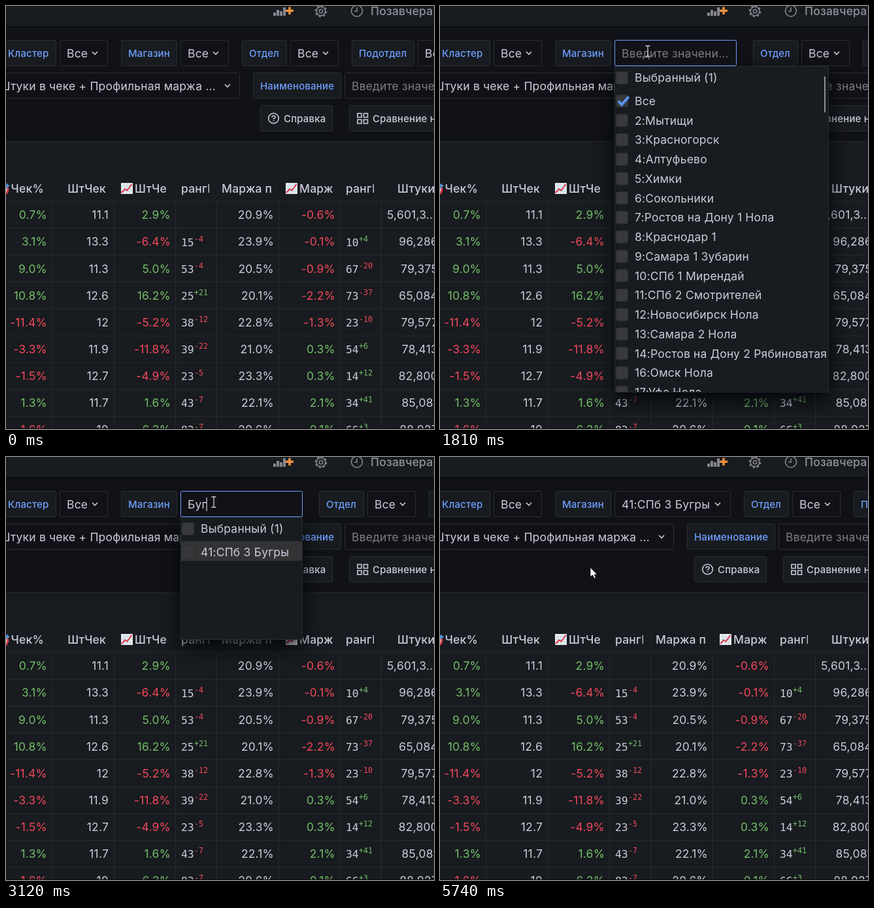
These frames come from a looping animation (655 by 648 pixels, 8 s). An HTML page:

```html
<!DOCTYPE html>
<html lang="ru">
<head>
<meta charset="utf-8">
<style>
html, body { margin: 0; width: 100%; height: 100%; overflow: hidden; background: #111217; }
svg { display: block; }
text { font: 17.5px Inter, sans-serif; letter-spacing: .0107em; fill: #ccccdc; white-space: pre; }
.label { font-size: 15px; font-weight: 500; fill: #6e9fff; }
.button { font-size: 15px; font-weight: 500; }
.head { font-weight: 500; }
.time { font-weight: 500; fill: #92929d; }
.hint { fill: #7b7c86; }
.up { fill: #73bf69; }
.down { fill: #f2495c; }
.rank, .sup { font: 16.4px "DejaVu Sans Mono", monospace; letter-spacing: 0; }
.sup { font-size: 11.7px; }
.icon { fill: none; stroke: #ccccdc; stroke-width: 1.6; }
</style>
</head>
<body>
<svg id="stage" width="655" height="648" viewBox="0 0 655 648">
  <defs>
    <filter id="shadow" filterUnits="userSpaceOnUse" x="200" y="30" width="460" height="640" color-interpolation-filters="sRGB">
      <feDropShadow dx="0" dy="10" stdDeviation="15" flood-color="rgb(1,4,9)"/>
    </filter>
    <g id="chart">
      <rect width="18" height="17" rx="1" fill="#e9edf0"/>
      <path d="M0 4.5H18M0 8.5H18M0 12.5H18M4.5 0V17M9 0V17M13.5 0V17" stroke="#b9d3df" stroke-width=".8"/>
      <path d="M1 15L6 9.500L9.500 11.500L16.500 2" fill="none" stroke="#dc3548" stroke-width="2"/>
    </g>
  </defs>
  <g id="base"></g>
  <g id="live"></g>
  <g id="pointer"></g>
</svg>
<script>
const LOOP = 8000;
const $ = id => document.getElementById(id);

// Text is placed by the vertical centre of its capitals, on a whole-pixel baseline.
const text = (x, y, s, cls = '', anchor = 'start') => {
  const size = /label|button/.test(cls) ? 15 : cls.includes('sup') ? 11.7 : cls.includes('rank') ? 16.4 : 17.5;
  return `<text x="${x}" y="${Math.round(y + size * .364)}" class="${cls}" text-anchor="${anchor}">${s}</text>`;
};
const rect = (x, y, w, h, fill, extra = '') =>
  `<rect x="${x}" y="${y}" width="${w}" height="${h}" fill="${fill}" ${extra}/>`;
const box = (x1, y1, x2, fill, stroke = '#2b2e34') =>
  rect(x1 + .5, y1 + .5, x2 - x1 - 1, 39, fill, `rx="2" stroke="${stroke}"`);
const chevron = (x, y) => `<path class="icon" d="M${x - 4} ${y - 2}l4 4l4-4"/>`;
const label = (x1, x2, y, s) => box(x1, y, x2, '#181b1f') + text(x1 + 11, y + 20.5, s, 'label');
const select = (x1, x2, s) => box(x1, 52, x2, '#111217') + text(x1 + 11, 72.5, s) + chevron(x2 - 20, 72);
const sign = s => s[0] === '-' ? 'down' : 'up';

const columns = [70, 165, 259, 322, 417, 511, 574];
const rows = [
  '0.7% 11.1 2.9% _ 20.9% -0.6% _ 5,601,3...',
  '3.1% 13.3 -6.4% 15-4 23.9% -0.1% 10+4 96,286',
  '9.0% 11.3 5.0% 53-4 20.5% -0.9% 67-20 79,375',
  '10.8% 12.6 16.2% 25+21 20.1% -2.2% 73-37 65,084',
  '-11.4% 12 -5.2% 38-12 22.8% -1.3% 23-10 79,577',
  '-3.3% 11.9 -11.8% 39-22 21.0% 0.3% 54+6 78,413',
  '-1.5% 12.7 -4.9% 23-5 23.3% 0.3% 14+12 82,800',
  '1.3% 11.7 1.6% 43-7 22.1% 2.1% 34+41 85,081',
  '-1.6% 10 6.3% 83-7 20.6% 0.1% 66+3 88,927'
];

function cell(value, col, y) {
  if (value === '_') return '';
  if (col === 3 || col === 6) {
    const x = columns[col - 1] + 9, delta = value.slice(2);
    return text(x, y + .5, value.slice(0, 2), 'rank') + text(x + 20, y - 4.5, delta, 'sup ' + sign(delta));
  }
  if (col === 7) return value.includes('...') ? text(583, y, value) : text(661, y, value, '', 'end');
  const colored = col === 0 || col === 2 || col === 5;
  const pad = value.endsWith('%') ? 7 : 8;
  return text(columns[col] - pad, y, value, colored ? sign(value) : '', 'end');
}

function table() {
  let out = rect(0, 207, 655, 441, '#181b1f') + rect(0, 207, 655, 1, '#25272d');
  const clipped = (x, w, s) => `<svg x="${x}" y="265" width="${w}" height="30">${text(0, 15, s, 'head')}</svg>`;
  out += '<circle cx="-5" cy="281" r="8" fill="#d8dce0" stroke="#d33a45" stroke-width="3"/>' +
    '<path d="M-3 281L3 275" stroke="#3f8fd0" stroke-width="2.500"/><path d="M0 275l2-4l1 3l3 1l-4 3z" fill="#4aa3e8"/>';
  out += text(58, 280, 'Чек%', 'head', 'end') + text(153, 280, 'ШтЧек', 'head', 'end') +
    text(197, 280, 'ШтЧе', 'head') + clipped(268, 43, 'рангШт') + clipped(330, 76, 'Маржа п') +
    text(449, 280, 'Марж', 'head') + clipped(520, 43, 'рангМ') + text(599, 280, 'Штуки', 'head') +
    '<use href="#chart" x="176" y="271"/><use href="#chart" x="428" y="271"/>';
  rows.forEach((row, i) => {
    const top = 299 + 41.1 * i;
    out += rect(0, Math.round(top), 655, 1, '#26292e');
    row.split(' ').forEach((v, col) => out += cell(v, col, top + 21));
  });
  columns.forEach(x => out += rect(x, 299, 1, 349, '#26292e'));
  return out + rect(0, 647, 655, 1, '#0c080b');
}

function header() {
  const bars = [[409, 5], [414, 9], [419, 7], [424, 13]].map(([x, h]) => rect(x, 15 - h, 4, h, '#85858f')).join('');
  return rect(0, 0, 655, 32, '#181b1f') + rect(0, 31, 655, 2, '#0b0c0f') + bars +
    '<path d="M434 1.500V13M428 7.200H440" stroke="#f0913f" stroke-width="3.600"/>' +
    `<g class="icon" style="stroke:#85858f"><circle cx="482" cy="8" r="6.800"/><circle cx="482" cy="8" r="2.700"/>
     <circle cx="482" cy="8" r="8.300" stroke-width="2" stroke-dasharray="3.260"/>
     <circle cx="537" cy="7.500" r="8.500"/><path d="M537 2V8H533"/></g>` +
    text(558, 8, 'Позавчера', 'time');
}

function filters() {
  return label(-8, 77, 52, 'Кластер') + select(82, 156, 'Все') + label(176, 262, 52, 'Магазин') +
    box(-40, 102, 358, '#111217') + text(321, 122.5, 'Штуки в чеке + Профильная маржа ...', '', 'end') + chevron(339, 122) +
    label(378, 513, 102, 'Наименование') + box(518, 102, 700, '#111217') + text(529, 122.5, 'Введите значение', 'hint') +
    box(389, 152, 500, '#181b1f') + text(425, 172.5, 'Справка', 'button') +
    '<g class="icon"><circle cx="409.500" cy="172" r="7.800"/><path d="M407 170.500q0-2.500 2.500-2.500t2.500 2.200q0 1.300-2.500 2.300v1M409.500 175v1.500"/></g>' +
    box(525, 152, 700, '#181b1f') + text(561, 172.5, 'Сравнение н', 'button') +
    '<path class="icon" d="M538 164.500h6v6h-6zM547.500 164.500h6v6h-6zM538 174h6v6h-6zM547.500 174h6v6h-6z"/>';
}

const lists = {
  all: ['Все', '2:Мытищи', '3:Красногорск', '4:Алтуфьево', '5:Химки', '6:Сокольники',
    '7:Ростов на Дону 1 Нола', '8:Краснодар 1', '9:Самара 1 Зубарин', '10:СПб 1 Мирендай',
    '11:СПб 2 Смотрителей', '12:Новосибирск Нола', '13:Самара 2 Нола',
    '14:Ростов на Дону 2 Рябиноватая', '16:Омск Нола', '17:Уфа Нола'],
  one: ['9:Самара 1 Зубарин', '10:СПб 1 Мирендай', '11:СПб 2 Смотрителей', '12:Новосибирск Нола',
    '14:Ростов на Дону 2 Рябиноватая', '25:Екатеринбург Ламповый', '30:Новосибирск 2 Войлочный',
    '36:Барнаул Тумаковский', '38:Челябинск', '39:Набережные Челны', '41:СПб 3 Бугры',
    '42:СПб 4 Садовника Ермилы', '44:Новокузнецк Бочкоремонтная', '49:Люберцы',
    '53:Екатеринбург 2 Корзинщиков', '58:Ярославль Ромбик'],
  two: ['25:Екатеринбург Ламповый', '41:СПб 3 Бугры', '53:Екатеринбург 2 Корзинщиков',
    '61:Оренбург', '72:Екатеринбург 3', '78:Оренбург 2'],
  last: ['41:СПб 3 Бугры']
};
// right edge, bottom edge, scroll thumb height
const frames = { all: [595, 592, 55], one: [595, 592, 184], two: [575, 309, 0], last: [454, 280, 0] };

function dropdown(name, checked) {
  const [right, bottom, thumb] = frames[name], w = right - 267, h = bottom - 92;
  const tick = y => `<path d="M273 ${y}l5 5.500l11-12" fill="none" stroke="#5794f2" stroke-width="4"/>`;
  const check = y => rect(269.5, y - 9.5, 18, 19, '#38393c', 'rx="3" stroke="#2c2d30"');
  let out = rect(267.5, 92.5, w - 1, h - 1, '#181b1f', 'stroke="#282b30" filter="url(#shadow)"');
  out += `<svg x="267" y="92" width="${w}" height="${h - 1}" viewBox="267 92 ${w} ${h - 1}">`;
  if (name !== 'all') out += rect(268, 129, w - 2, 30, '#333335');
  out += check(110) + text(298, 110, 'Выбранный (1)');
  lists[name].forEach((s, i) => {
    const y = 145.5 + 29.75 * i;
    out += check(y) + text(298, y, s);
    if (!i && (name === 'all' || checked)) out += tick(y);
  });
  if (thumb) out += rect(588, 108, 2, thumb, '#8e8f94');
  return out + '</svg>';
}

const typed = [[1300, '', 278], [2310, 'Б', 290], [2610, 'Бу', 299], [3120, 'Буг', 307], [3420, 'Бугр', 318], [3620, 'Бугры', 331]];
const caretOff = [[1810, 2310], [2900, 3120], [3920, 4420], [4920, 9999]];

function live(t) {
  const open = t >= 1300 && t < 5740, shift = open ? 118 : t < 1300 ? 0 : 104;
  let out = `<g transform="translate(${shift})">` + label(361, 430, 52, 'Отдел') + select(435, 509, 'Все') +
    label(529, 625, 52, 'Подотдел') + select(630, 704, 'Все') + '</g>';
  if (!open) return out + (shift ? select(267, 445, '41:СПб 3 Бугры') : select(267, 341, 'Все'));
  const [, word, caretX] = typed.filter(([at]) => t >= at).pop();
  const name = ['all', 'one', 'two'][word.length] || 'last';
  out += dropdown(name, t >= 5020) + box(267, 52, 454, '#111217', t < 4920 ? '#6e9fff' : '#2b2e34') +
    text(278, 72.5, word || 'Введите значени...', word ? '' : 'hint');
  if (!caretOff.some(([a, b]) => t >= a && t < b)) out += rect(caretX - .5, 62, 1.2, 21, '#ccccdc');
  return out;
}

const shapes = {
  arrow: '<path d="M0 0V15L3.500 11.800L6 17L8.500 16L6 11H10.500Z" fill="#fff" stroke="#000" stroke-width=".8"/>',
  hand: '<path d="M-2 1.500C-2-.5 2-.5 2 1.500V7L8 8.500Q10 9 10 11V15Q9 19 7 21H-1Q-5 16-6.500 12.500Q-6.500 10-4 11L-2 13Z" fill="#fff" stroke="#000" stroke-width=".8"/>',
  beam: '<path d="M-3.500-8H-1L0-7L1-8H3.500M0-7V7M-3.500 8H-1L0 7L1 8H3.500" fill="none" stroke="#d0d0d4" stroke-width="1.300"/>'
};

// The pointer advances in 100 ms steps.
const steps = (t, start, count) => Math.max(0, Math.min(1, (Math.floor((t - start) / 100) + 1) / count));
const along = (a, b, k) => a.map((v, i) => v + (b[i] - v) * k);

function pointer(t) {
  const field = [318, 69], item = [281, 139.5], rest = [230, 169];
  let p, kind;
  if (t < 300) return '';
  if (t < 1300) {
    p = along([640, 680], field, Math.sin(steps(t, 300, 10) * Math.PI / 2));
    kind = p[1] < 92 ? 'hand' : 'arrow';
  } else if (t < 5220) {
    p = along(field, item, steps(t, 4220, 6));
    kind = p[1] > 92 ? 'hand' : 'beam';
  } else {
    p = along(item, rest, steps(t, 5220, 5));
    kind = p[0] < 267 ? 'arrow' : 'hand';
  }
  const click = t >= 4920 && t < 5020 ? '<circle cx="-1" cy="-.5" r="15" fill="#b0a61c" opacity=".92"/>' : '';
  return `<g transform="translate(${p})">${click}${shapes[kind]}</g>`;
}

const shown = {};
function put(id, html) {
  if (shown[id] !== html) $(id).innerHTML = shown[id] = html;
}

function draw(now) {
  const t = now % LOOP;
  put('live', live(t));
  put('pointer', pointer(t));
  requestAnimationFrame(draw);
}

$('base').innerHTML = header() + table() + filters();
draw(0);
</script>
</body>
</html>
```
